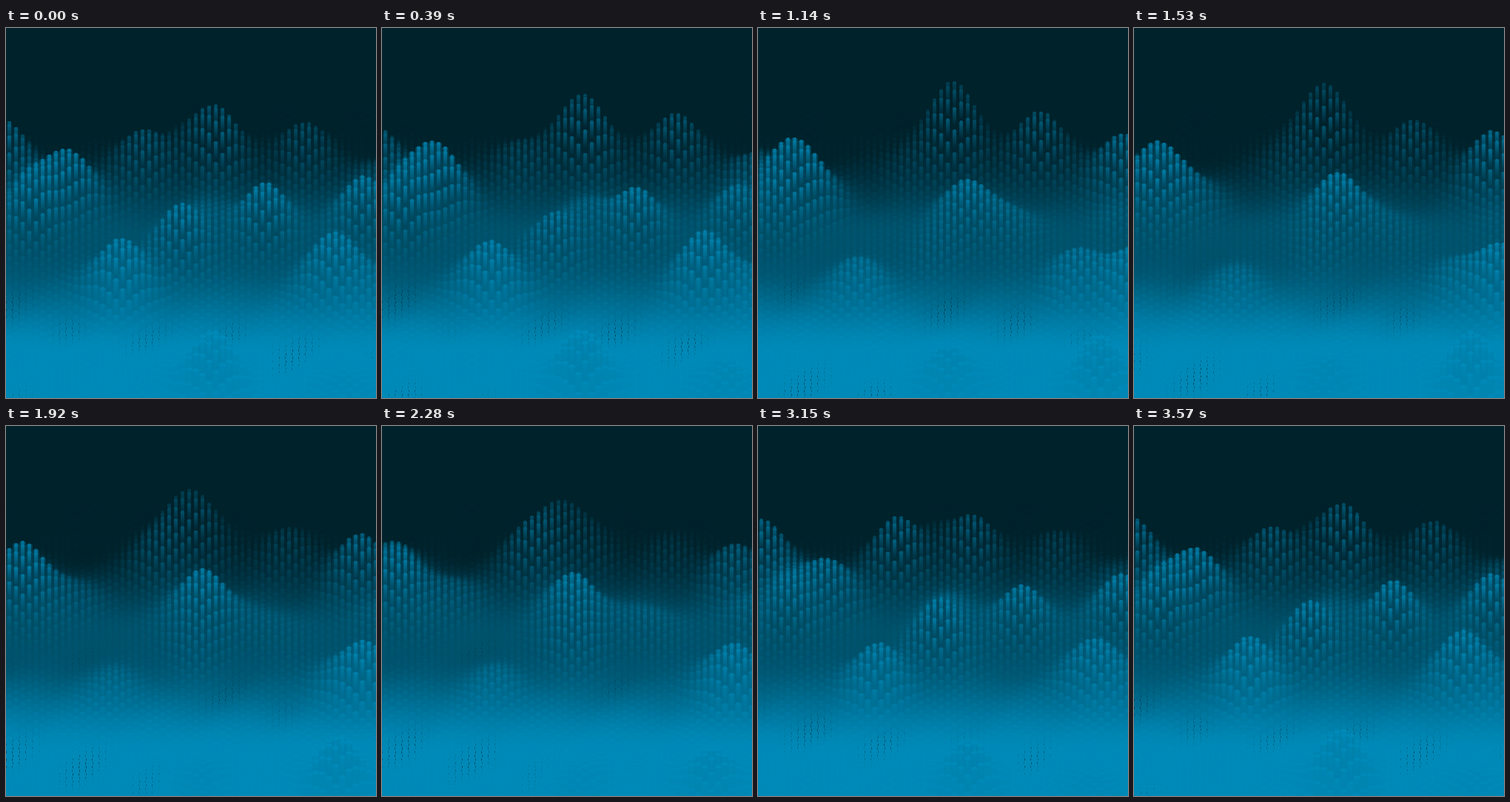
An HTML page with a canvas for the animation above (3600 ms loop, 500 by 500 pixels).

```html
<!DOCTYPE html>
<html>
<head>
<meta charset="utf-8">
<style>
  html, body { margin: 0; width: 100%; height: 100%; overflow: hidden; background: #00222b; }
  canvas { display: block; }
</style>
</head>
<body>
<canvas id="stage" width="500" height="500"></canvas>
<script>
const ctx = document.getElementById('stage').getContext('2d');
const LOOP = 3600, TAU = Math.PI * 2;
const ROW = 5, COL = 18, PILLAR = 9;
const DARK = [0, 34, 43], BRIGHT = [0, 138, 184];
const RADIUS = 42, MEAN = 43, SWING = 25, SWAY = 12;

// Hills: x, depth, moment of the loop when highest
const HILLS = [
  [255, 160, .42], [0, 200, .95], [280, 186, .05], [390, 183, .2],
  [195, 195, .78], [488, 214, .4], [85, 242, .05], [28, 240, .45],
  [268, 268, .5], [350, 284, 0], [32, 276, .05], [490, 275, .92],
  [245, 310, .9], [150, 358, .05], [440, 350, .05], [495, 365, .45],
  [272, 482, .08], [455, 488, .42]
];

const clamp = (v, lo, hi) => Math.min(hi, Math.max(lo, v));

function smooth(a, b, v) {
  const k = clamp((v - a) / (b - a), 0, 1);
  return k * k * (3 - 2 * k);
}

// The mist brightens in two steps towards the viewer
const mist = z => .45 * smooth(165, 280, z) + .55 * smooth(305, 440, z);
const mix = v => `rgb(${DARK.map((d, i) => Math.round(d + (BRIGHT[i] - d) * v))})`;

function makeGlow() {
  const glow = document.createElement('canvas');
  glow.width = 5;
  glow.height = 26;
  const g = glow.getContext('2d');
  const fade = g.createLinearGradient(0, 0, 0, 26);
  fade.addColorStop(0, `rgba(${BRIGHT}, 1)`);
  fade.addColorStop(1, `rgba(${BRIGHT}, 0)`);
  g.fillStyle = fade;
  g.beginPath();
  g.roundRect(0, 0, 5, 30, 2.5);
  g.fill();
  return glow;
}

const glow = makeGlow();

function hillsAt(t) {
  return HILLS.map(([x, z, peak]) => {
    const a = TAU * (t - peak);
    return { x: x - SWAY * Math.sin(a), z, h: MEAN + SWING * Math.cos(a) };
  });
}

function heightAt(x, z, hills, t) {
  let h = 4 + 4 * Math.sin(x / 40 + z / 22) * Math.cos(x / 31 - TAU * t);
  for (const hill of hills) {
    const dx = (x - hill.x) / RADIUS, dz = (z - hill.z) / (RADIUS * .7);
    h += hill.h * Math.exp(-dx * dx - dz * dz);
  }
  return h;
}

function drawRow(z, offset, hills, t) {
  const ground = mist(z);
  const light = Math.min(.8, Math.sqrt(Math.max(0, z - 146) / 150));
  const pillars = [];
  ctx.globalAlpha = 1;
  ctx.fillStyle = mix(ground);
  ctx.beginPath();
  for (let x = offset - COL; x < 500; x += COL) {
    const h = heightAt(x + PILLAR / 2, z, hills, t);
    pillars.push([x, h]);
    ctx.roundRect(x, z - h, PILLAR, h + 12, 4);
  }
  ctx.fill();

  ctx.fillStyle = '#001a22';
  for (const [x, h] of pillars) {
    const k = Math.min(1, h / 65);
    ctx.globalAlpha = .25 * k * (1 - .65 * ground);
    ctx.fillRect(x, z - h + 4, PILLAR, Math.max(0, h - 4));
    ctx.globalAlpha = light * k;
    ctx.drawImage(glow, x + 2, z - h);
  }
}

function draw() {
  const t = performance.now() % LOOP / LOOP;
  const hills = hillsAt(t);
  ctx.globalAlpha = 1;
  ctx.fillStyle = mix(0);
  ctx.fillRect(0, 0, 500, 500);
  for (let i = 0, z = 110; z < 580; i++, z += ROW) {
    drawRow(z, i % 2 * PILLAR, hills, t);
  }
  requestAnimationFrame(draw);
}

draw();
</script>
</body>
</html>
```
